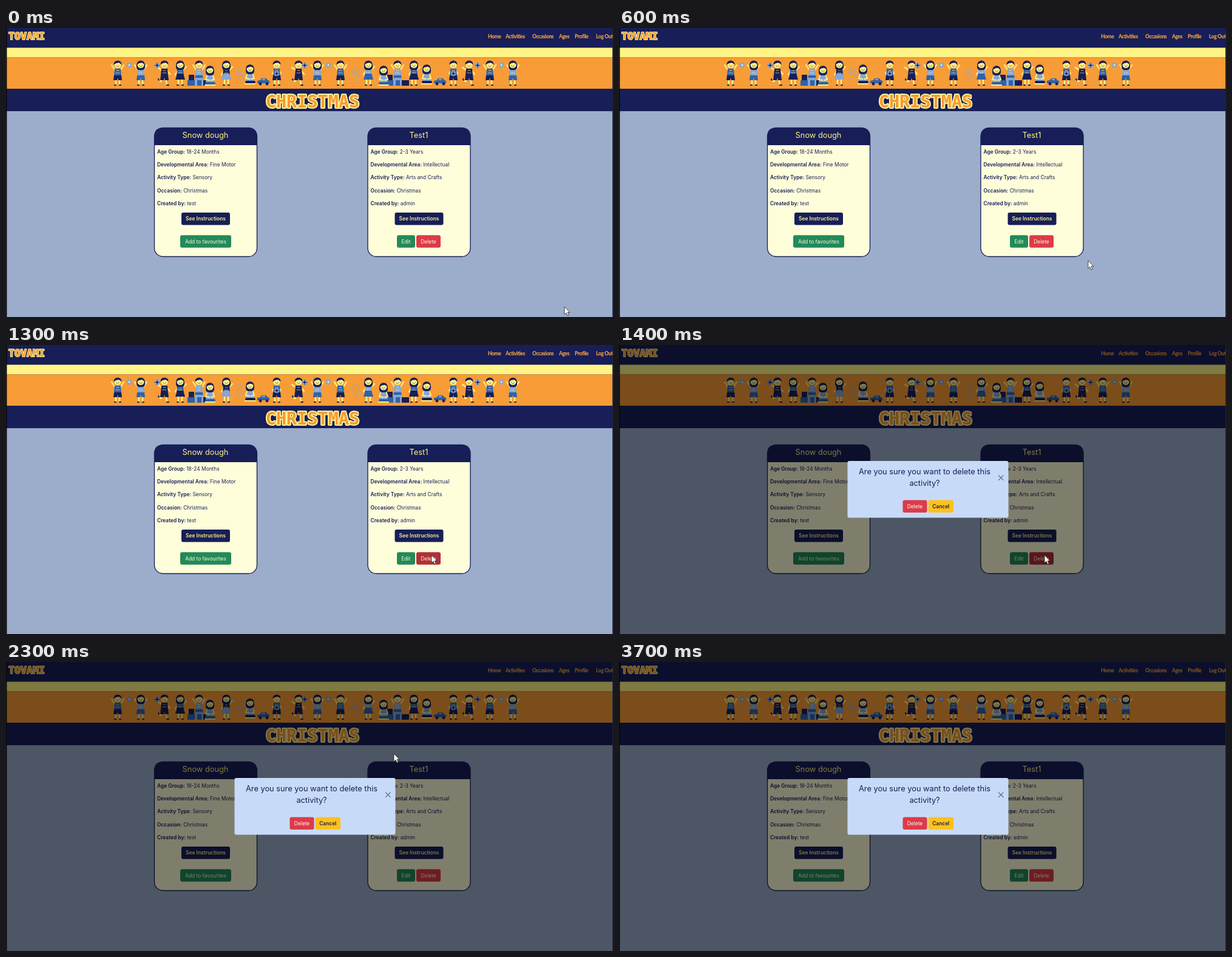
Recreate the animation shown at these times as an HTML page. Size 1000 by 476 pixels, loop 3800 ms.

```html
<!DOCTYPE html>
<html lang="en">
<head>
<meta charset="utf-8">
<style>
  html, body { margin: 0; width: 1000px; height: 476px; overflow: hidden; background: #9cadcc; }
  svg { display: block; font: 8.4px Inter, sans-serif; }
  .mid { text-anchor: middle; }
  .bold { font-weight: 600; }
  .title { font-size: 12.8px; text-anchor: middle; }
  .nav { font: 800 8.5px Lato, sans-serif; letter-spacing: -.4px; fill: #f9a23c; }
  .display { font-family: "DejaVu Sans Mono", monospace; font-weight: 700; fill: #f79b33;
    stroke: #fff29a; stroke-linejoin: round; paint-order: stroke; }
</style>
</head>
<body>
<svg id="stage" width="1000" height="476" viewBox="0 0 1000 476"></svg>
<script>
const NAVY = '#171e58', BLUE = '#2f62a8', PALE = '#86a6d6', SKIN = '#fff388',
      CREAM = '#fffeda', GREEN = '#238a59', RED = '#dc3b48', RED_HOVER = '#b02f38';
const LOOP = 3800, STEP = 100, MODAL_AT = 1400, LEAVE_AT = 1800;

const rect = (x, y, w, h, fill, r = 0, extra = '') =>
  `<rect x="${x}" y="${y}" width="${w}" height="${h}" rx="${r}" fill="${fill}" ${extra}/>`;
const circle = (x, y, r, fill) => `<circle cx="${x}" cy="${y}" r="${r}" fill="${fill}"/>`;
const line = (d, color, w) =>
  `<path d="${d}" fill="none" stroke="${color}" stroke-width="${w}" stroke-linecap="round" stroke-linejoin="round"/>`;
const shape = (d, fill) => `<path d="${d}" fill="${fill}"/>`;
const text = (x, y, s, fill, cls = '', extra = '') =>
  `<text x="${x}" y="${y}" fill="${fill}" class="${cls}" ${extra}>${s}</text>`;
const at = (x, y, body) => `<g transform="translate(${x} ${y})">${body}</g>`;
const button = (x, y, w, label, fill, color, cls = '', extra = '') =>
  rect(x, y, w, 20.5, fill, 3, extra) + text(x + w / 2, y + 13.2, label, color, 'mid ' + cls);

// Children are drawn around x = 0, with the top of the head near y = 54
function head(y, long) {
  return (long ? rect(-7, y - 4, 14, 13, NAVY, 5) : '') +
    circle(0, y, 5.6, SKIN) +
    shape(`M-6.2 ${y}C-8 ${y - 9} 8 ${y - 9} 6.2 ${y}Q3 ${y - 4} 0 ${y - 3}Q-3 ${y - 3} -6.2 ${y}`, NAVY) +
    circle(-2, y + 1, .6, NAVY) + circle(2, y + 1, .6, NAVY) +
    line(`M-1.4 ${y + 3}Q0 ${y + 4} 1.4 ${y + 3}`, NAVY, .6);
}
const ARMS = {
  up: 'M-4 70L-10 61M4 70L10 61',
  kick: 'M-4 70L-11 65M4 70L9 76',
  dress: 'M-4 70L-8 77M4 70L10 64',
  hold: 'M-4 70L-7 75L0 76M4 70L7 75L0 76'
};
function kid(pose, top, bottom, long) {
  if (pose === 'sit')
    return shape('M-5 74H5L7 88H-7Z', top) + line('M-5 77L-7 83L-1 84M5 77L7 83L2 84', SKIN, 2) +
      line('M-6 89H7', bottom, 4) + line('M-8 92H8', SKIN, 2) + head(67, long);
  const legs = pose === 'kick' ? 'M-2 83L-6 88L-9 86M2 83L4 93' : 'M-3 83V93M3 83V93';
  return line(legs, SKIN, 2.4) +
    line(pose === 'kick' ? 'M-9 86L-10 84M4 94H7' : 'M-5 94H-3M3 94H5', NAVY, 2) +
    line(ARMS[pose], SKIN, 2.2) +
    shape('M-5 67H5L6 79H-6Z', top) +
    (pose === 'dress' ? shape('M-5 75H5L8 85H-8Z', bottom)
      : shape('M-6 78H6L7 86H1L0 82L-1 86H-7Z', bottom)) +
    line('M-2 70H2M-3 74H3', SKIN, .7) + head(60.5, long) +
    (pose === 'hold' ? ball(0, 75) : '');
}
const ball = (x, y) => circle(x, y, 4.4, PALE) + circle(x, y, 1.7, NAVY) +
  line(`M${x - 4} ${y}H${x + 4}M${x} ${y - 4}V${y + 4}`, NAVY, .7);
const star = (x, y) => circle(x, y, 4.2, PALE) + circle(x, y, 1.5, SKIN);
const car = x => at(x, 0, shape('M-10 91V87L-5 86L-3 83H5L7 86L10 87V91Z', BLUE) +
  rect(-2, 84, 5, 2, PALE) + circle(-5, 92, 2.4, NAVY) + circle(6, 92, 2.4, NAVY));
const ribbon = x => line(`M${x - 5} 70q8 -9 10 -2t-9 5q-2 6 9 4t-6 7l6 4`, PALE, .8);
const blocks = x => rect(x - 19, 86, 12, 9, BLUE) + rect(x - 7, 82, 14, 13, PALE) +
  rect(x + 7, 86, 12, 9, NAVY) + rect(x - 17, 77, 9, 9, NAVY) + rect(x - 3, 86, 7, 9, BLUE);

const kids = [
  [184, 'up', BLUE, NAVY], [222, 'up', PALE, BLUE, 1], [261, 'kick', NAVY, NAVY], [287, 'dress', BLUE, NAVY, 1],
  [318, 'up', PALE, BLUE], [363, 'dress', NAVY, PALE, 1], [402, 'sit', PALE, NAVY, 1], [446, 'hold', BLUE, NAVY],
  [482, 'kick', NAVY, NAVY], [513, 'up', PALE, BLUE, 1], [551, 'up', BLUE, NAVY], [597, 'dress', PALE, BLUE, 1],
  [645, 'up', PALE, BLUE], [672, 'dress', BLUE, NAVY, 1], [693, 'sit', PALE, NAVY, 1], [737, 'hold', BLUE, NAVY],
  [763, 'kick', NAVY, NAVY], [797, 'up', BLUE, NAVY], [835, 'up', PALE, BLUE, 1]
];
const parade = kids.map(([x, ...look]) => at(x, 0, kid(...look))).join('') +
  blocks(318) + blocks(645) +
  [336, 622].map(x => at(x, 2, kid('sit', PALE, BLUE, 1))).join('') +
  [249, 492, 777].map(x => ball(x, 61.5)).join('') +
  [203, 531, 816].map(x => star(x, 61)).join('') +
  [424, 715].map(car).join('') + [383, 575].map(ribbon).join('');

const nav = [['Home', 794], ['Activities', 823], ['Occasions', 867], ['Ages', 911], ['Profile', 937], ['Log Out', 972]]
  .map(([label, x]) => text(x, 16.5, label, '', 'nav')).join('');

function card(x, title, values, actions) {
  const labels = ['Age Group', 'Developmental Area', 'Activity Type', 'Occasion', 'Created by'];
  return at(x, 164, rect(.5, .5, 169, 212, CREAM, 14) +
    shape('M.5 29V14Q.5 .5 14 .5H156Q169.5 .5 169.5 14V29Z', NAVY) +
    rect(.5, .5, 169, 212, 'none', 14, `stroke="${NAVY}" stroke-width="1.3"`) +
    text(84.5, 16.8, title, SKIN, 'title') +
    labels.map((label, i) => text(5, 42.8 + i * 21.3,
      `<tspan class="bold">${label}:</tspan> ${values[i]}`, NAVY)).join('') +
    button(45, 140, 80, 'See Instructions', NAVY, SKIN, 'bold') + actions);
}

const modal = rect(0, 0, 1000, 476, '#000', 0, 'opacity=".5"') +
  rect(376.5, 191, 265, 93.5, '#c7dbf8', 3) +
  line('M377 246H641', '#bfd3f0', .8) +
  text(503.5, 213, 'Are you sure you want to delete this', NAVY, 'title') +
  text(503.5, 232, 'activity?', NAVY, 'title') +
  line('M625.5 215L633 222.5M633 215L625.5 222.5', '#63708c', 1.2) +
  button(467.5, 255.5, 40, 'Delete', RED, '#fff') +
  button(509.5, 255.5, 41.5, 'Cancel', '#ffc11c', NAVY, 'bold');

const stage = document.getElementById('stage');
stage.innerHTML =
  rect(0, 0, 1000, 476, '#9cadcc') +
  rect(0, 0, 1000, 137, NAVY) + rect(0, 32.5, 1000, 16, '#fff485') + rect(0, 48.5, 1000, 51.5, '#f79c36') +
  parade + nav +
  text(4, 19, 'TOVAMI', '', 'display', 'font-size="16.6" stroke-width="2"') +
  text(505, 130.5, 'CHRISTMAS', '', 'display mid', 'font-size="28.5" stroke-width="4"') +
  card(244, 'Snow dough', ['18-24 Months', 'Fine Motor', 'Sensory', 'Christmas', 'test'],
    button(43, 177.3, 84, 'Add to favourites', GREEN, CREAM)) +
  card(595.5, 'Test1', ['2-3 Years', 'Intellectual', 'Arts and Crafts', 'Christmas', 'admin'],
    button(48.5, 177.3, 30, 'Edit', GREEN, CREAM) +
    button(80.5, 177.3, 40, 'Delete', RED, CREAM, '', 'id="delete"')) +
  `<g id="modal">${modal}</g>` +
  rect(0, 0, 1.4, 476, '#08080c') + rect(999, 0, 1, 476, '#20263f') +
  `<path id="cursor" d="M0 0V13L3 10.3L5 15L7.2 14L5.2 9.5H9Z" fill="#fff" stroke="#222" stroke-width=".8"/>`;

const [deleteButton, modalLayer, cursor] = ['delete', 'modal', 'cursor'].map(id => document.getElementById(id));
const mix = (a, b, k) => a.map((v, i) => v + (b[i] - v) * k);

function cursorAt(t) {
  const start = [920, 459], target = [701, 346], turn = [639, 151], exit = [514, 0];
  if (t < LEAVE_AT) return mix(start, target, 1 - Math.max(0, 1 - t / 1300) ** 1.8);
  return t < 2300 ? mix(target, turn, (t - LEAVE_AT) / 500) : mix(turn, exit, (t - 2300) / 500);
}

function draw(now) {
  const t = Math.floor(now % LOOP / STEP) * STEP;
  const [x, y] = cursorAt(t);
  cursor.setAttribute('transform', `translate(${x} ${y})`);
  deleteButton.setAttribute('fill', x < 716 && t <= LEAVE_AT ? RED_HOVER : RED);
  modalLayer.style.display = t >= MODAL_AT ? '' : 'none';
  requestAnimationFrame(draw);
}
draw(0);
</script>
</body>
</html>
```
